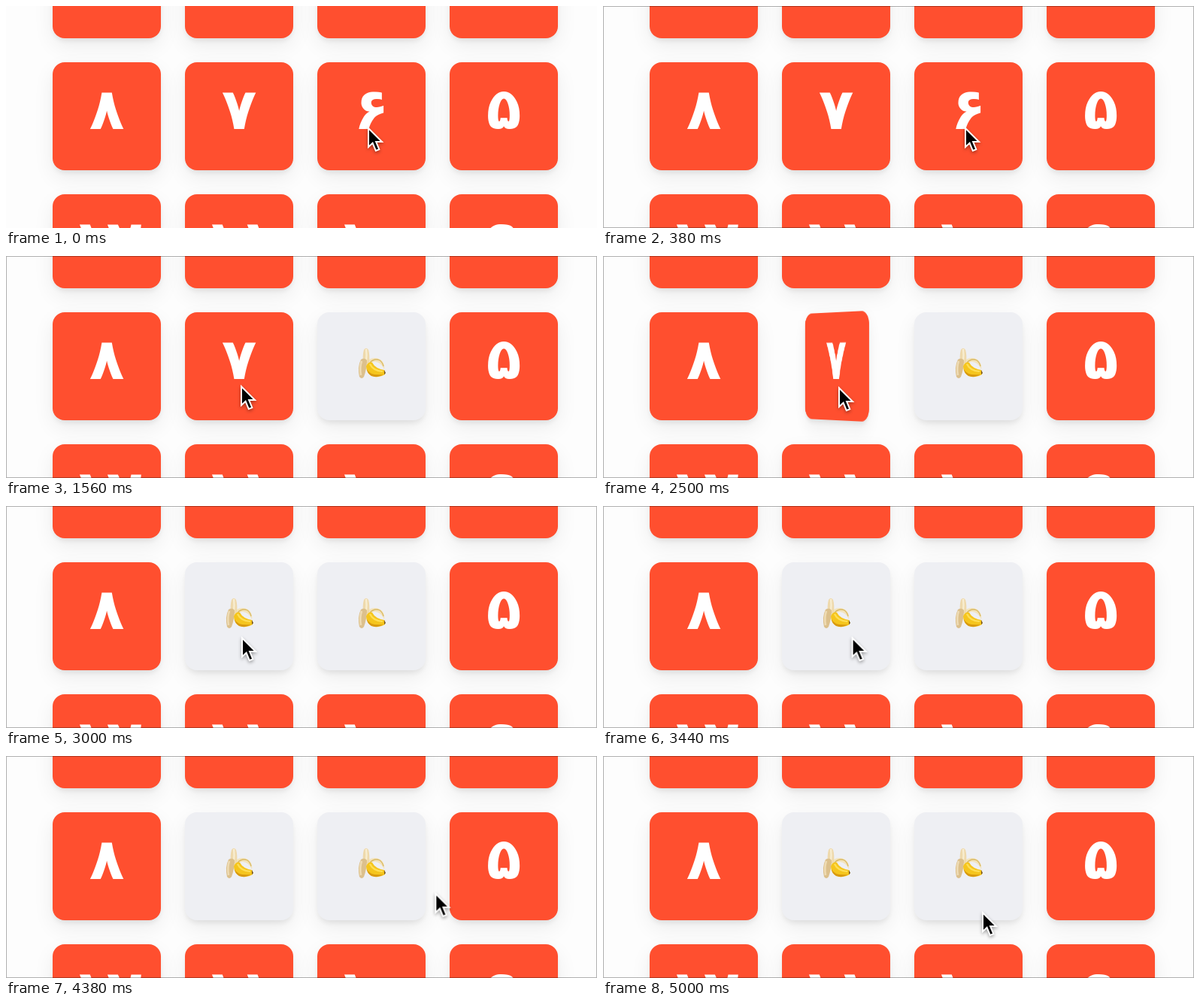
Write an HTML page that moves like this. It is 786 px wide and 296 px high and loops after 5060 ms.

```html
<!DOCTYPE html>
<html lang="fa">
<head>
<meta charset="utf-8">
<title>Memory cards</title>
<style>
  html, body { margin: 0; width: 100%; height: 100%; overflow: hidden; background: #fdfdfd; }
  #stage { position: relative; width: 786px; height: 296px; overflow: hidden; direction: ltr; }
  .card { position: absolute; width: 144px; height: 144px; perspective: 2000px; }
  .inner { width: 100%; height: 100%; transform-style: preserve-3d; }
  .face {
    position: absolute; inset: 0; border-radius: 16px; background: #ff4f2f;
    backface-visibility: hidden;
    box-shadow: 0 10px 28px rgba(0, 0, 0, .07), 0 5px 9px -2px rgba(0, 0, 0, .09);
  }
  .back { background: #eeeff3; transform: rotateY(180deg); }
  svg { display: block; overflow: visible; }
  text { font-family: "DejaVu Sans", sans-serif; font-weight: bold; fill: #fff; text-anchor: middle; }
  #frame { position: absolute; inset: 0; box-sizing: border-box; border: 1px solid rgba(0, 0, 0, .3); }
  #cursor { position: absolute; left: 0; top: 0; filter: drop-shadow(0 2px 2px rgba(0, 0, 0, .35)); }
</style>
</head>
<body>
<div id="stage">
  <div id="frame"></div>
  <svg id="cursor" width="24" height="38">
    <path d="M2 3V28L7.6 22.8L11.8 33L16.3 31.1L12.1 21H20Z" fill="#000" stroke="#fff" stroke-width="2"/>
  </svg>
</div>
<script>
const LOOP = 5060;
const SIZE = 144, PITCH = 176, LEFT = 62, TOP = -101;
const DIGIT_HEIGHT = 49, DIGIT_BOTTOM = 89;
const FLIP_TIME = 600;
const FLIPS = { 6: 400, 7: 2380 };

// time, x, y of the pointer
const PATH = [
  [0, 480, 160], [1190, 480, 160], [1560, 311, 171], [2300, 312, 173],
  [3340, 312, 173], [3880, 559, 173], [4080, 586, 174],
  [4500, 566, 182], [4900, 503, 206], [LOOP, 503, 206]
];

const BANANA = `
  <svg width="144" height="144">
    <path d="M66 66C70 60 82 59 87 66Q90 71 89 76Q85 67 77 66Q70 66 67 73Z" fill="#f3e4bd"/>
    <path d="M70 67Q76 61 83 64Q87 67 88 72" fill="none" stroke="#d9b964" stroke-width="1.3"/>
    <path d="M62 50Q65 46 68 50Q70 57 69 67Q65 70 61 67Q60 57 62 50Z" fill="#eed9ac"/>
    <path d="M65 49Q66 57 65 66" fill="none" stroke="#f8edcf" stroke-width="2.4"/>
    <path d="M58 63Q63 60 66 64Q66 75 62 86Q59 90 56 86Q53 73 58 63Z" fill="#dcc08c"/>
    <path d="M59 65Q56 74 58 84" fill="none" stroke="#eedbb3" stroke-width="2.6"/>
    <path d="M65 72Q67 66 73 67Q77 75 89 77Q91 80 90 83Q82 88 73 85Q65 81 65 72Z" fill="#f5c51d"/>
    <path d="M66 76Q70 85 88 83Q80 88 72 85Q66 81 66 76Z" fill="#d99a10"/>
    <path d="M70 69Q74 78 87 79" fill="none" stroke="#ffdf55" stroke-width="2.2"/>
    <path d="M89 77L91 81L89 83Z" fill="#73521e"/>
  </svg>`;

const stage = document.getElementById("stage");
const frame = document.getElementById("frame");
const cursor = document.getElementById("cursor");

const persian = n => String(n).replace(/\d/g, d => String.fromCharCode(0x6f0 + +d));

// One font size for all cards, taken from the ink height of a digit.
function digitMetrics() {
  const ctx = document.createElement("canvas").getContext("2d");
  ctx.font = 'bold 100px "DejaVu Sans", sans-serif';
  const m = ctx.measureText(persian(8));
  const scale = DIGIT_HEIGHT / (m.actualBoundingBoxAscent + m.actualBoundingBoxDescent);
  return { size: 100 * scale, base: DIGIT_BOTTOM - m.actualBoundingBoxDescent * scale };
}

function loop(el, steps) {
  const frames = steps.map(([time, props]) => ({ offset: time / LOOP, ...props }));
  el.animate(frames, { duration: LOOP, iterations: Infinity });
}

function addCard(n, font) {
  const row = Math.floor((n - 1) / 4), col = 3 - (n - 1) % 4;
  const card = document.createElement("div");
  card.className = "card";
  card.style.left = LEFT + col * PITCH + "px";
  card.style.top = TOP + row * PITCH + "px";
  card.innerHTML = `
    <div class="inner">
      <div class="face"><svg width="${SIZE}" height="${SIZE}">
        <text x="72" y="${font.base}" font-size="${font.size}">${persian(n)}</text>
      </svg></div>
      ${n in FLIPS ? `<div class="face back">${BANANA}</div>` : ""}
    </div>`;
  stage.insertBefore(card, frame);
  if (n in FLIPS) {
    const start = FLIPS[n];
    const turn = deg => ({ transform: `rotateY(${deg}deg)` });
    loop(card.firstElementChild, [
      [0, turn(0)],
      [start, { ...turn(0), easing: "ease" }],
      [start + FLIP_TIME, turn(-180)],
      [LOOP, turn(-180)]
    ]);
  }
}

const font = digitMetrics();
for (let n = 1; n <= 12; n++) addCard(n, font);

loop(cursor, PATH.map(([time, x, y]) => [
  time, { transform: `translate(${x}px, ${y}px)`, easing: "ease-in-out" }
]));
loop(frame, [[0, { opacity: 0 }], [60, { opacity: 0 }], [60, { opacity: 1 }], [LOOP, { opacity: 1 }]]);
</script>
</body>
</html>
```
